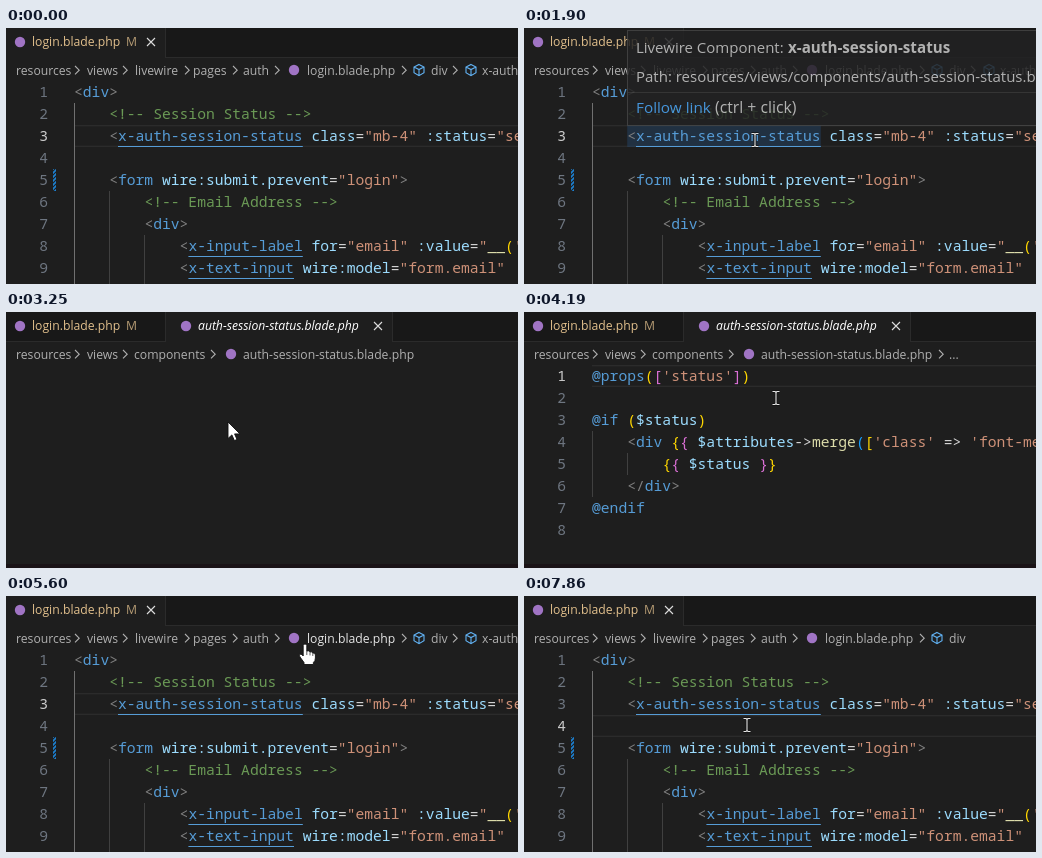
These frames come from a looping animation (512 px wide and 256 px high, 8 s). An HTML page:

```html
<!DOCTYPE html>
<html lang="en">
<head>
<meta charset="utf-8">
<title>Editor link preview</title>
<style>
  html, body { margin: 0; width: 100%; height: 100%; overflow: hidden; background: #1e1e1e; }
  svg { display: block; width: 512px; height: 256px; }
  text { white-space: pre; }
  .code { font: 14.667px "Noto Sans Mono", monospace; }
  .ui { font: 12.2px "Open Sans", sans-serif; fill: #b0b0b0; }
  .tip { font: 15px "Open Sans", sans-serif; fill: #ccc; }
  .ui.mod { fill: #e2c08d; }
  .ui.faint { fill: #b59b74; }
  .ui.on { fill: #fff; font-style: italic; }
  .ui.hot { fill: #e6e6e6; }
  .stroke { fill: none; stroke: #b0b0b0; stroke-width: 1.1; }
</style>
</head>
<body>
<svg id="stage" viewBox="0 0 512 256">
  <defs>
    <pattern id="hatch" width="4" height="4" patternUnits="userSpaceOnUse">
      <path d="M-1 1L1 -1M0 4L4 0M3 5L5 3" stroke="#1b81d4" stroke-width="1.7"/>
    </pattern>
    <g id="arrow">
      <path d="M0 0V16.5L3.9 12.9L6.4 18.6L9 17.5L6.6 11.9H11.9Z" fill="#fff" stroke="#111" stroke-width=".9"/>
    </g>
    <g id="beam" fill="none">
      <path d="M-3.5 -6.5H-1L0 -5.5L1 -6.5H3.5M0 -5.5V5.5M-3.5 6.5H-1L0 5.5L1 6.5H3.5" stroke="#111" stroke-width="2.6"/>
      <path d="M-3.5 -6.5H-1L0 -5.5L1 -6.5H3.5M0 -5.5V5.5M-3.5 6.5H-1L0 5.5L1 6.5H3.5" stroke="#e8e8e8" stroke-width="1.1"/>
    </g>
    <g id="hand">
      <path d="M-1.8 1.5Q-1.8 0 0 0T1.8 1.5V7Q4.6 6 5 8Q7.4 7.2 7.8 9Q10.4 8.6 10.4 11V14Q10.4 17 8.4 18.5V20.5H-1V18.5L-5 13Q-6.4 10.8 -4.6 10.2Q-3.2 10 -1.8 12Z" fill="#fff" stroke="#111" stroke-width=".9"/>
      <path d="M1.8 7V11M5 8V11.4M7.8 9V12" stroke="#333" stroke-width=".8"/>
    </g>
    <path id="cube" class="stroke" d="M0 -5.6L5 -3V2.6L0 5.6L-5 2.6V-3ZM-5 -3L0 -.4L5 -3M0 -.4V5.6" style="stroke:#62b3f5"/>
  </defs>
  <rect width="512" height="256" fill="#1e1e1e"/>
  <rect width="512" height="30" fill="#181818"/>
  <g id="login"></g>
  <g id="part"></g>
  <g id="tipBig"></g>
  <g id="tipSmall"></g>
  <use id="pointer"/>
</svg>
<script>
const $ = id => document.getElementById(id);
const CHAR = 8.8, LEFT = 68, ROW = 22, TOP = 53;
const colors = {
  g: '#808080', t: '#569cd6', a: '#9cdcfe', s: '#ce9178', c: '#6a9955', w: '#d4d4d4',
  y: '#ffd700', m: '#da70d6', b: '#179fff', f: '#dcdcaa'
};
const esc = s => s.replace(/&/g, '&amp;').replace(/</g, '&lt;');
const rect = (x, y, w, h, fill, more = '') =>
  `<rect x="${x}" y="${y}" width="${w}" height="${h}" fill="${fill}" ${more}/>`;
const text = (cls, x, y, s, more = '') => `<text class="${cls}" x="${x}" y="${y}" ${more}>${esc(s)}</text>`;
const label = (x, y, s, cls = '', more = '') => text('ui ' + cls, x, y, s, more);
const dot = (x, y) => `<circle cx="${x}" cy="${y}" r="5.2" fill="#a074c4"/>`;
const chevron = x => `<path class="stroke" d="M${x - 2} 38l4.2 4.2l-4.2 4.2"/>`;
const cube = x => `<use href="#cube" x="${x}" y="42"/>`;
const cross = x => `<path class="stroke" style="stroke:#ddd" d="M${x - 4} 10l8 8m0 -8l-8 8"/>`;
const crumbs = list => list.map(([x, s]) => label(x, 46.5, s)).join('');

// "~k" switches colour to key k, "!" after it adds a link underline
function codeLine(row, col, src) {
  const y = TOP + (row - 1) * ROW + 16;
  let spans = '', lines = '', n = col;
  for (const [, key, link, s] of src.matchAll(/~(\w)(!?)([^~]*)/g)) {
    spans += `<tspan fill="${colors[key]}">${esc(s)}</tspan>`;
    if (link) lines += rect(LEFT + n * CHAR, y + 5, s.length * CHAR, 1, colors[key]);
    n += s.length;
  }
  return text('code', LEFT + col * CHAR, y, '').replace('</text>', spans + '</text>') + lines;
}
const guide = (level, from, to, color = '#404040') =>
  rect(LEFT + Math.round(level * 4 * CHAR), TOP + (from - 1) * ROW, 1, (to - from + 1) * ROW, color);

const numbers = (count, id) => Array.from({ length: count }, (_, i) =>
  text('code', 42, TOP + i * ROW + 16, String(i + 1), `text-anchor="end" fill="#6e7681" id="${id}${i + 1}"`)).join('');
const lineBox = id => `<g id="${id}">${rect(LEFT, 0, 450, 1.3, '#2b2b2b')}${rect(LEFT, 20.7, 450, 1.3, '#2b2b2b')}</g>`;

$('login').innerHTML =
  rect(0, 0, 159, 30, '#1e1e1e') + rect(159, 0, 1, 30, '#2b2b2b') + rect(160, 29, 352, 1, '#2b2b2b') +
  dot(14, 14) + label(26, 18, 'login.blade.php', 'mod') + label(120, 18, 'M', 'faint') + cross(145) +
  crumbs([[10, 'resources'], [81, 'views'], [129, 'livewire'], [187, 'pages'], [237, 'auth'], [425, 'div']]) +
  [71, 119, 181, 229, 271, 398].map(chevron).join('') + dot(288, 42) +
  label(301, 46.5, 'login.blade.php', '', 'id="loginCrumb"') + cube(413) +
  `<g id="tailCrumb">${chevron(449)}${cube(465)}${label(476, 46.5, 'x-auth-session-status')}</g>` +
  lineBox('loginBox') + numbers(9, 'n') + rect(47, 141, 3, 22, 'url(#hatch)') +
  guide(0, 2, 10, '#707070') + guide(1, 6, 10) + guide(2, 8, 10) +
  rect(LEFT + 4 * CHAR, TOP + 2 * ROW, 22 * CHAR, ROW, '#264f78', 'opacity=".4" id="hoverMark"') +
  codeLine(1, 0, '~g<~tdiv~g>') +
  codeLine(2, 4, '~c<!-- Session Status -->') +
  codeLine(3, 4, '~g<~t!x-auth-session-status~a class~w=~s"mb-4"~a :status~w=~s"session') +
  codeLine(5, 4, '~g<~tform~a wire:submit.prevent~w=~s"login"~g>') +
  codeLine(6, 8, '~c<!-- Email Address -->') +
  codeLine(7, 8, '~g<~tdiv~g>') +
  codeLine(8, 12, '~g<~t!x-input-label~a for~w=~s"email"~a :value~w=~s"~f__~y(~s\'Email') +
  codeLine(9, 12, '~g<~t!x-text-input~a wire:model~w=~s"form.email"') +
  rect(LEFT, TOP + 3 * ROW, 2, ROW, '#aeafad', 'id="loginCaret"');

$('part').innerHTML =
  rect(160, 0, 226, 30, '#1e1e1e') + rect(159, 0, 1, 30, '#2b2b2b') + rect(386, 0, 1, 30, '#2b2b2b') +
  rect(0, 29, 160, 1, '#2b2b2b') + rect(387, 29, 125, 1, '#2b2b2b') +
  dot(14, 14) + label(26, 18, 'login.blade.php', 'mod') + label(120, 18, 'M', 'faint') +
  dot(180, 14) + label(192, 18, 'auth-session-status.blade.php', 'on') + cross(372) +
  crumbs([[10, 'resources'], [81, 'views'], [128, 'components']]) +
  [71, 119, 207].map(chevron).join('') + dot(225, 42) +
  label(237, 46.5, 'auth-session-status.blade.php', '', 'id="partCrumb"') +
  '<g id="partBody">' + chevron(417) + label(425, 46.5, '...') +
  `<g transform="translate(0 ${TOP})">${lineBox('partBox')}</g>` + numbers(8, 'p') +
  guide(0, 4, 6) + guide(1, 5, 5) +
  codeLine(1, 0, "~t@props~y(~m[~s'status'~m]~y)") +
  codeLine(3, 0, '~t@if ~y(~a$status~y)') +
  codeLine(4, 4, "~g<~tdiv ~y{~m{ ~a$attributes~w->~fmerge~b(~y[~s'class'~w => ~s'font-medium") +
  codeLine(5, 8, '~y{~m{ ~a$status ~m}~y}') +
  codeLine(6, 4, '~g</~tdiv~g>') +
  codeLine(7, 0, '~t@endif') +
  rect(LEFT, TOP, 2, ROW, '#aeafad', 'id="partCaret"') + '</g>' +
  rect(0, 252, 512, 4, '#1a1317');
$('p1').setAttribute('fill', '#ccc');

const follow = (x, y) =>
  text('tip', x, y, 'Follow link', 'style="fill:#4daafc;font-size:15.3px"') +
  text('tip', x + 79, y, '(ctrl + click)', 'style="font-size:15.8px"');
const frame = 'stroke="#454545"';
$('tipBig').innerHTML = rect(103.5, 2.5, 420, 95, '#222223', frame) +
  text('tip', 112, 24.5, 'Livewire Component:') +
  text('tip', 264, 24.5, 'x-auth-session-status', 'style="font-weight:700;font-size:15.2px"') +
  text('tip', 112, 53.5, 'Path: resources/views/components/auth-session-status.blade.php') +
  rect(104, 64, 408, 1, '#3a3a3a') + follow(112, 85);
$('tipSmall').innerHTML = rect(112.5, 62.5, 181, 34, '#222223', frame) + follow(121, 85);

// [time, shape, x, y]
const moves = [
  [0], [810, 'beam', 242, 238], [948, 'beam', 236, 203], [1086, 'beam', 231, 165], [1224, 'beam', 229, 136],
  [1362, 'beam', 230, 119], [1500, 'beam', 231, 112], [2330, 'beam', 231, 111],
  [2990, 'hand', 230, 110], [3120, 'arrow', 222, 110], [3370, 'beam', 228, 112],
  [3800, 'beam', 231, 110], [3941, 'beam', 238, 102], [4083, 'beam', 252, 86], [4224, 'beam', 270, 67],
  [4366, 'hand', 284, 46], [4507, 'hand', 294, 31], [4649, 'hand', 299, 20], [4790, 'hand', 301, 14],
  [5206, 'arrow', 302, 14], [5339, 'arrow', 302, 20], [5472, 'hand', 300, 34],
  [5600, 'hand', 299, 48], [5735, 'beam', 296, 78], [5870, 'beam', 288, 104],
  [6020, 'beam', 282, 106], [6161, 'beam', 271, 110], [6303, 'beam', 258, 114], [6444, 'beam', 245, 119],
  [6586, 'beam', 235, 123], [6727, 'beam', 228, 126], [6869, 'beam', 224, 128], [7010, 'beam', 223, 129]
];
const within = (t, a, b) => t >= a && t < b;
const show = (id, on) => { $(id).style.display = on ? '' : 'none'; };

function draw(t) {
  const part = within(t, 3120, 5206), row = t >= 7300 ? 4 : 3;
  show('login', !part);
  show('part', part);
  show('partBody', t >= 3370);
  show('partCaret', within(t, 3370, 3800) || within(t, 4224, 4649));
  show('loginCaret', within(t, 7300, 7860));
  show('tailCrumb', t < 7430);
  $('loginBox').setAttribute('transform', `translate(0 ${TOP + (row - 1) * ROW})`);
  for (const n of [3, 4]) $('n' + n).setAttribute('fill', n === row ? '#ccc' : '#6e7681');
  $('loginCrumb').classList.toggle('hot', within(t, 5472, 5735));
  $('partCrumb').classList.toggle('hot', within(t, 4366, 4507));

  const hover = within(t, 1900, 2330);
  show('tipBig', hover);
  show('hoverMark', hover);
  $('tipBig').setAttribute('opacity', t < 2050 ? 0.85 : 1);
  show('tipSmall', within(t, 2580, 2990));

  const [, shape, x, y] = moves.findLast(m => m[0] <= t);
  show('pointer', shape);
  if (shape) {
    $('pointer').setAttribute('href', '#' + shape);
    $('pointer').setAttribute('transform', `translate(${x} ${y})`);
  }
}

const start = performance.now();
function tick() {
  draw((performance.now() - start) % 8000);
  requestAnimationFrame(tick);
}
tick();
</script>
</body>
</html>
```
